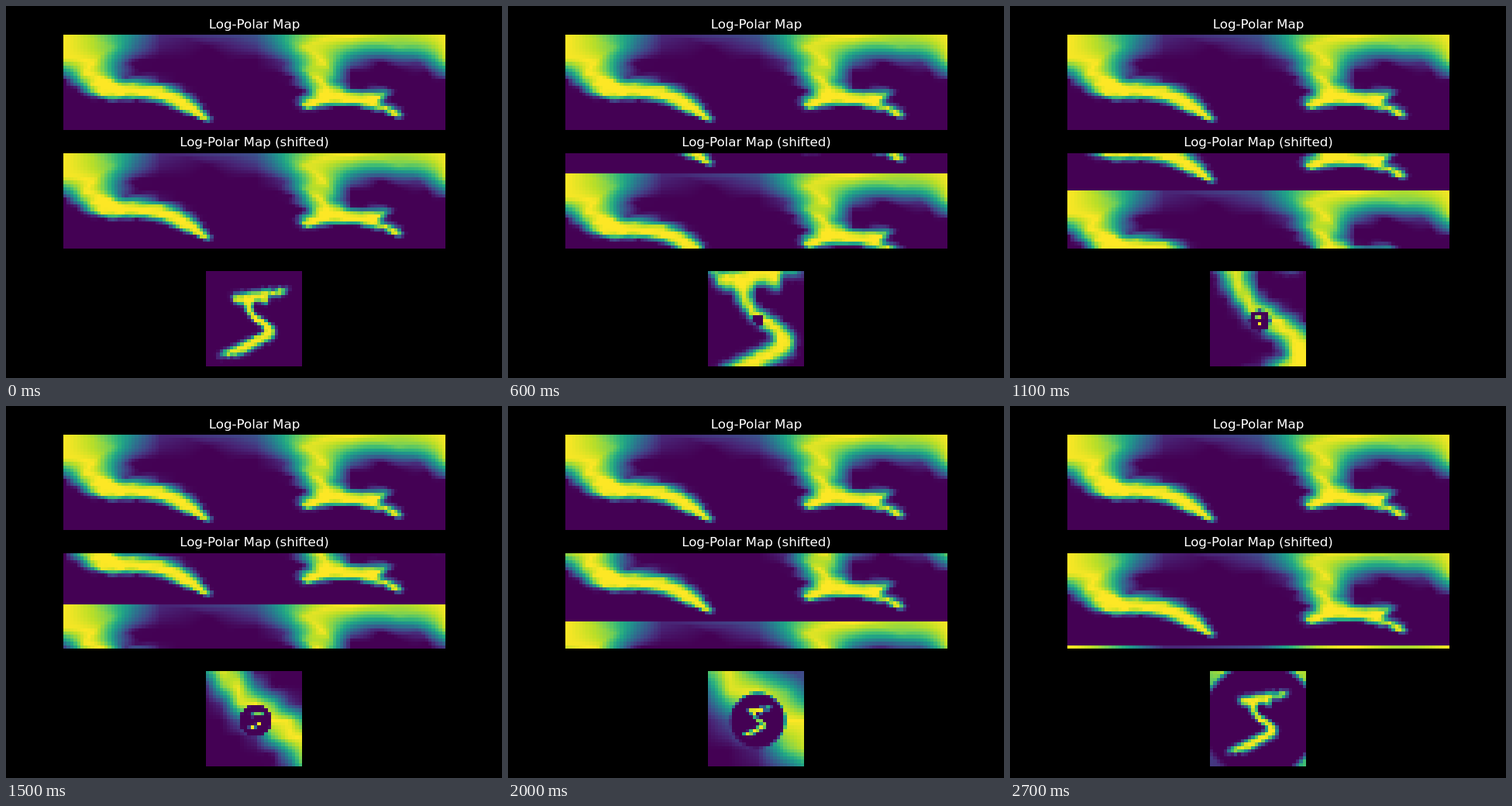
These frames come from a looping animation (640x480 px, 2.8 s). An HTML page with a canvas:

```html
<!DOCTYPE html>
<html lang="en">
<head>
<meta charset="utf-8">
<title>Log-Polar Map</title>
<style>
  html, body { margin: 0; width: 100%; height: 100%; overflow: hidden; background: #000; }
  canvas, svg { position: absolute; left: 0; top: 0; }
  text { font: 16.667px "DejaVu Sans", sans-serif; fill: #fff; text-anchor: middle; }
</style>
</head>
<body>
<canvas id="stage" width="640" height="480"></canvas>
<svg width="640" height="480">
  <text x="320.5" y="29">Log-Polar Map</text>
  <text x="320.5" y="181">Log-Polar Map (shifted)</text>
</svg>
<script>
const SIZE = 28, ANGLES = 112, MID = SIZE / 2, STEP_MS = 100;
const LOG_STEP = Math.log(MID * Math.SQRT2) / SIZE;
const TURN = 2 * Math.PI;

// Outline of the handwritten digit, in cells of a 28 x 28 grid
const DIGIT = `M7.8 7.1 L9.5 6.86 11.5 6.4 12.5 6.3 13.2 5.95 15.7 5.93 16.2 5.5 17.5 5.47 18.7 5.2
  19.5 6.1 20.2 5.45 21 5 22.9 5 23.55 5.4 23.5 6 22.8 6.8 21.5 7.2 20.5 7.32 18.2 7.35
  18 7.8 18 9.4 17.1 9.7 16.5 9.15 15.6 8.68 14.7 8.75 13.9 9.3 13.35 10.5 13.75 11.5
  14.27 12.5 15.93 13.5 17.57 14.5 18.7 15.5 19.74 16.5 20.23 17.5 19.9 18.7 19.5 19.7
  17.5 20.8 14.5 22.3 12.5 23.5 11.5 24 10.9 24.45 9.3 24.55 8.2 25 4.45 25 4.45 24
  4.9 23.6 6.5 23.04 10.5 21.07 12.5 20 14.5 18.9 16.7 18.1 17 17.3 16.57 16.5 15.1 15.5
  13.74 14.5 12.92 13.5 12.2 12.5 11.45 11.5 11.35 10.5 10.95 9.7 10.5 9.4 9.5 9.65
  8.6 9.25 7.9 8.6 Z`;

const VIRIDIS = ["440154", "482475", "414487", "355f8d", "2a788e", "21918c",
                 "22a884", "44bf70", "7ad151", "bddf26", "fde725"]
  .map(hex => [0, 2, 4].map(i => parseInt(hex.substr(i, 2), 16)));

const clamp = (v, lo, hi) => Math.min(hi, Math.max(lo, v));
const mod = (a, n) => ((a % n) + n) % n;
const mix = (a, b, f) => a + (b - a) * f;

function makeCanvas(w, h) {
  const c = document.createElement("canvas");
  c.width = w;
  c.height = h;
  return c;
}

function makeGrid(w, h, value) {
  const cells = new Float32Array(w * h);
  for (let y = 0; y < h; y++)
    for (let x = 0; x < w; x++) cells[y * w + x] = value(x, y);
  return cells;
}

function bilinear(get, x, y) {
  const x0 = Math.floor(x), y0 = Math.floor(y), fx = x - x0, fy = y - y0;
  return mix(mix(get(x0, y0), get(x0 + 1, y0), fx),
             mix(get(x0, y0 + 1), get(x0 + 1, y0 + 1), fx), fy);
}

function rasterDigit() {
  const g = makeCanvas(SIZE, SIZE).getContext("2d", { willReadFrequently: true });
  g.fill(new Path2D(DIGIT));
  const { data } = g.getImageData(0, 0, SIZE, SIZE);
  return makeGrid(SIZE, SIZE, (x, y) => data[(y * SIZE + x) * 4 + 3] / 255);
}

// Rows are log radius, columns are angle
function toPolar(image) {
  const get = (x, y) =>
    x < 0 || y < 0 || x >= SIZE || y >= SIZE ? 0 : image[y * SIZE + x];
  return makeGrid(ANGLES, SIZE, (col, row) => {
    const r = Math.exp(row * LOG_STEP), a = col / ANGLES * TURN;
    return bilinear(get, MID + r * Math.cos(a), MID + r * Math.sin(a));
  });
}

function fromPolar(polar) {
  const get = (col, row) =>
    polar[clamp(row, 0, SIZE - 1) * ANGLES + mod(col, ANGLES)];
  return makeGrid(SIZE, SIZE, (x, y) => {
    const dx = x - MID, dy = y - MID;
    const row = Math.log(Math.max(1, Math.hypot(dx, dy))) / LOG_STEP;
    return bilinear(get, mod(Math.atan2(dy, dx), TURN) / TURN * ANGLES, row);
  });
}

const roll = (polar, shift) => makeGrid(ANGLES, SIZE,
  (col, row) => polar[mod(row - shift, SIZE) * ANGLES + col]);

function paint(cells, w) {
  const canvas = makeCanvas(w, SIZE), g = canvas.getContext("2d");
  const img = g.createImageData(w, SIZE);
  cells.forEach((v, i) => {
    const t = clamp(v, 0, 1) * (VIRIDIS.length - 1);
    const n = Math.min(Math.floor(t), VIRIDIS.length - 2);
    for (let c = 0; c < 3; c++)
      img.data[i * 4 + c] = Math.round(mix(VIRIDIS[n][c], VIRIDIS[n + 1][c], t - n));
    img.data[i * 4 + 3] = 255;
  });
  g.putImageData(img, 0, 0);
  return canvas;
}

const ctx = document.getElementById("stage").getContext("2d");
ctx.imageSmoothingEnabled = false;
const polar = toPolar(rasterDigit());
ctx.drawImage(paint(polar, ANGLES), 74, 37, 493, 123);

let shown = -1;
function draw(now) {
  const shift = Math.floor(now / STEP_MS) % SIZE;
  if (shift !== shown) {
    const shifted = roll(polar, shift);
    ctx.drawImage(paint(shifted, ANGLES), 74, 190, 493, 123);
    ctx.drawImage(paint(fromPolar(shifted), SIZE), 258, 342, 124, 123);
    shown = shift;
  }
}

const start = performance.now();
function tick() {
  draw(performance.now() - start);
  requestAnimationFrame(tick);
}
tick();
</script>
</body>
</html>
```
